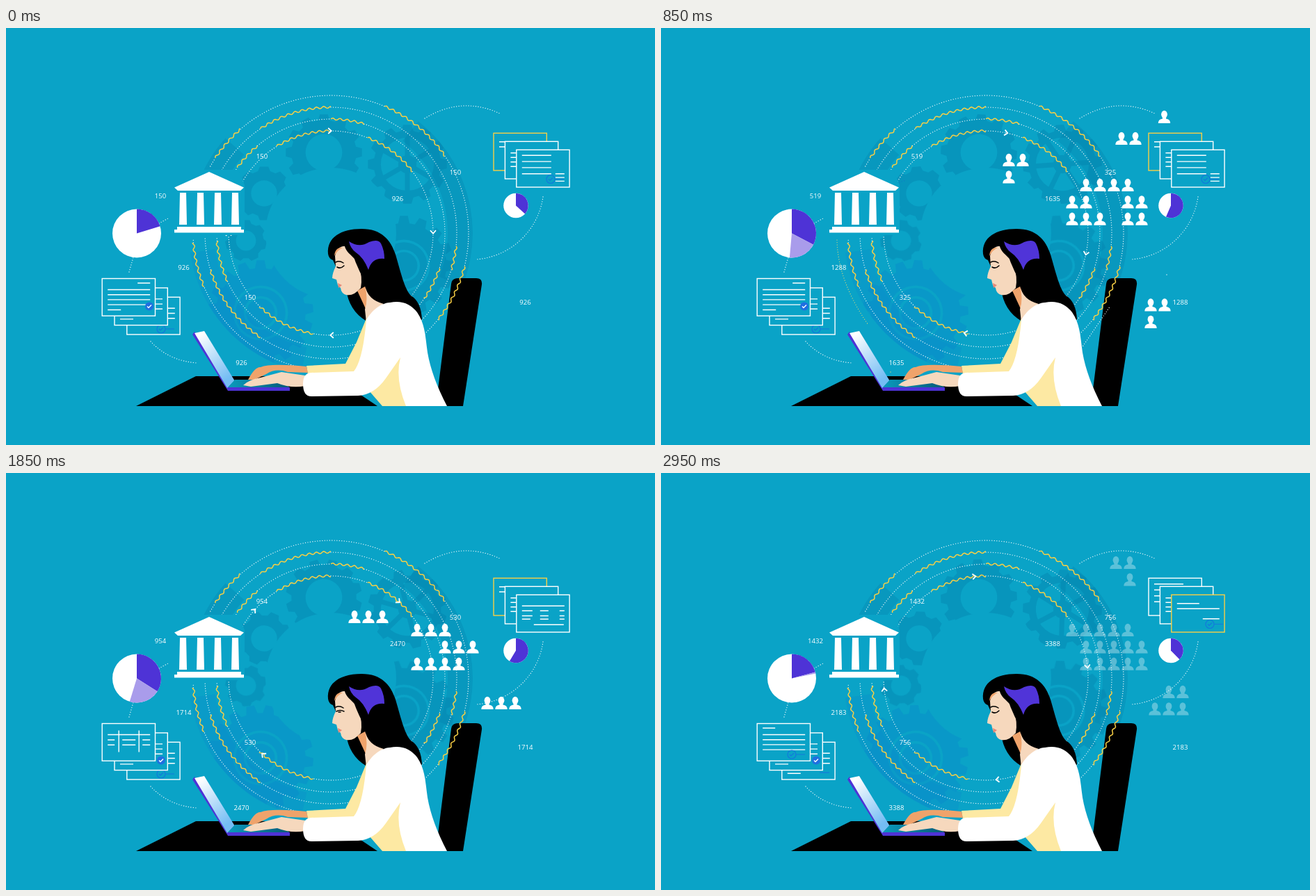
An HTML page for the animation above (3000 ms loop, 933 by 600 pixels).

```html
<!DOCTYPE html>
<html lang="en">
<head>
<meta charset="utf-8">
<title>Data cycle</title>
<style>
html, body { margin: 0; width: 100%; height: 100%; overflow: hidden; background: #0aa3c7; }
svg { display: block; width: 100vw; height: 100vh; }
text { font: 9.6px "Open Sans", "Noto Sans", sans-serif; fill: #fff; text-anchor: middle; }
.dots { fill: none; stroke: #fff; stroke-width: 1.3; stroke-linecap: round; stroke-dasharray: 0 3.5; }
.wave { fill: none; stroke: #f8cf45; stroke-width: 1.5; }
.line { fill: none; stroke: #fff; stroke-width: 1.4; }
.blue { fill: none; stroke: #1478dc; stroke-width: 1.2; }
.skin { fill: #f6d8bd; }
.shadow { fill: #efa36b; }
</style>
</head>
<body>
<svg viewBox="0 0 933 600">
  <defs>
    <linearGradient id="screen" x1="0" y1="0" x2=".5" y2="1">
      <stop offset=".1" stop-color="#fff"/><stop offset="1" stop-color="#74bdf4"/>
    </linearGradient>
    <linearGradient id="keys">
      <stop offset="0" stop-color="#0a9bbd"/><stop offset="1" stop-color="#075a78"/>
    </linearGradient>
    <mask id="band"><circle cx="467" cy="295" r="149" fill="none" stroke="#fff" stroke-width="110"/></mask>
    <g id="person" fill="#fff">
      <ellipse cy="-3.700" rx="4.400" ry="5.500"/>
      <path d="M-2.500 0H2.500V2.600Q8.700 3.500 8.700 9H-8.700Q-8.700 3.500 -2.500 2.600z"/>
    </g>
  </defs>
  <rect width="933" height="600" fill="#0aa3c7"/>
  <g id="gears" mask="url(#band)"></g>
  <path d="M618 544L640 368Q641 360 650 360H676Q685 360 684 369L657 544z"/>
  <g id="rings"></g>
  <g id="trails"></g>
  <g id="arrows"></g>
  <g id="temple"></g>
  <g class="dots">
    <path d="M602 130Q656 97 712 124"/><path d="M772 243A105 105 0 0 1 676 333"/>
    <path d="M208 451Q234 479 275 482"/><path d="M177 351L183 330"/><path d="M220 281L233 274"/>
  </g>
  <g id="pies"></g>
  <g id="cards"></g>
  <g id="people"></g>

  <g id="laptop">
    <path d="M187 544L273 501H470L534 544z"/>
    <path fill="#4e33d6" d="M268 441L271 437L322 517H408V522H319z"/>
    <path fill="url(#screen)" d="M271 439L285 436L329 508L318 518z"/>
    <path fill="url(#keys)" d="M319 517L329 506H400L407 517z"/>
  </g>

  <g id="head">
    <path d="M463 325C461 301 482 289 511 289C540 289 553 305 560 326C567 350 573 376 582 385Q597 394 598 420L540 402L517 421Q493 406 489 376L470 334Q464 332 463 325z"/>
    <path class="skin" d="M473 328Q477 313 487 314C490 326 502 328 507 342Q513 358 510 374Q500 386 489 384Q482 382 481 374L477 370L475 362L469 360Q469 353 474 343z"/>
    <path class="shadow" d="M472 328Q473 315 484 316Q476 320 472 328z"/>
    <path fill="#e88a78" d="M477 367L483 370L478 374z"/>
    <path class="shadow" d="M505 378L516 372L524 392L517 404z"/>
    <path class="skin" d="M516 371Q520 391 543 397Q527 406 518 424L516 405Q521 390 516 371z"/>
    <path d="M493 307Q510 372 545 396L576 394L544 310z"/>
    <path fill="#5034d8" d="M493 307Q508 317 522 308Q535 303 539 310Q544 320 544 332Q526 330 521 348Q514 330 503 323Q495 317 493 307z"/>
    <g fill="none" stroke="#000" stroke-linecap="round" stroke-width="1.5">
      <path d="M474 337Q479 334 485 338"/>
      <path id="shut" d="M476 344Q481 347 486 342"/>
      <path id="open" d="M475 343Q480 340 486 343M478 344H481"/>
    </g>
  </g>

  <g id="body">
    <path fill="#fde9a3" d="M518 418L504 452L488 483L432 486L434 499H502L541 544H580L570 470z"/>
    <path class="shadow" d="M348 506Q358 487 366 488Q380 482 432 487L434 496L405 495Q388 489 374 498L357 506z"/>
    <path class="skin" d="M341 514Q349 506 366 503L396 495L430 500V515Q410 519 390 511L352 516z"/>
    <path fill="#fff" d="M518 420C525 408 537 396 552 395Q576 390 591 409C603 426 603 447 606 467Q612 502 634 544H575Q559 505 567 474L546 504Q529 528 506 529L439 530Q427 530 427 512Q427 497 438 496L500 494Q513 478 518 420z"/>
  </g>
  <g id="numbers"></g>
</svg>
<script>
const LOOP = 3000, STEP = 50, STAGE = 1000, PEAK = 1350;
const CX = 467, CY = 295;
const BACK = "#0aa3c7", YELLOW = "#f8cf45", PURPLE = "#4e33d6";
const $ = id => document.getElementById(id);
const rad = a => a * Math.PI / 180;
const clamp = v => Math.max(0, Math.min(1, v));
const show = (node, on) => { node.style.display = on ? "" : "none"; };

// Angles are in degrees, clockwise from the top.
const polar = (a, r, x = CX, y = CY) =>
  `${(x + r * Math.sin(rad(a))).toFixed(2)} ${(y - r * Math.cos(rad(a))).toFixed(2)}`;

function add(parent, tag, attrs = {}) {
  const node = document.createElementNS("http://www.w3.org/2000/svg", tag);
  for (const key in attrs) node.setAttribute(key, attrs[key]);
  return parent.appendChild(node);
}

function curve(a, b, step, radius) {
  const n = Math.max(2, Math.ceil((b - a) / step));
  const points = Array.from({ length: n + 1 }, (_, i) => a + (b - a) * i / n);
  return "M" + points.map(angle => polar(angle, radius(angle))).join("L");
}

// Rings are dotted, with wavy spans between the given angles.
const wavySpans = [
  [[-57, -41], [23, 56], [104, 129], [247, 266]],
  [[-34, 0], [96, 107], [214, 253]],
  [[-55, -40], [0, 17], [108, 125], [245, 266]],
  [[-32, 0], [21, 53], [190, 224]]
];
wavySpans.forEach((spans, i) => {
  const r = 198 - 17 * i;
  let from = -61;
  for (const [a, b] of [...spans, [268, 268]]) {
    add($("rings"), "path", { class: "dots", d: curve(from, a, 1, () => r) });
    const wave = angle => r + 1.4 * Math.sin(rad(angle - a) * r * 2 * Math.PI / 10.5);
    if (b > a) add($("rings"), "path", { class: "wave", d: curve(a, b, .4, wave) });
    from = b;
  }
});

function gearPath(r, teeth) {
  let d = "";
  for (let i = 0; i < teeth; i++) {
    for (const k of [-.34, -.2, .2, .34]) {
      d += (d ? "L" : "M") + polar((i + k) * 360 / teeth, Math.abs(k) > .3 ? r * .85 : r, 0, 0);
    }
  }
  return d + "z";
}
const circlePath = r => `M${-r} 0a${r} ${r} 0 1 0 ${2 * r} 0a${r} ${r} 0 1 0 ${-2 * r} 0z`;

const gearStyles = {
  hole: (g, r) => gearPath.call(null, r, teethOf(r)) + circlePath(r * .48),
  spokes(g, r, fill) {
    add(g, "circle", { r: r * .23, fill });
    for (let a = 0; a < 360; a += 60) {
      add(g, "path", { d: "M0 0L" + polar(a, r * .7, 0, 0), stroke: fill, "stroke-width": 7 });
    }
    return gearPath(r, teethOf(r)) + circlePath(r * .67);
  },
  rings: (g, r) => gearPath(r, teethOf(r)) + [.52, .47, .32, .27].map(k => circlePath(r * k)).join("")
};
function teethOf(r) { return Math.round(r / 4.6); }

function arcBand(a, b, stroke) {
  add($("gears"), "path", { d: curve(a, b, 1, () => 186), fill: "none", stroke, "stroke-width": 36, opacity: .27 });
}
const shade = "#067aa6", deep = "#0c84cc";
arcBand(38, 112, shade);
arcBand(192, 262, deep);
arcBand(296, 312, shade);
const gears = [
  [457, 179, 55, "hole"], [577, 196, 57, "spokes"], [366, 410, 76, "rings"],
  [371, 238, 39, "hole"], [345, 306, 30, "hole"], [572, 342, 72, "rings"]
].map(([x, y, r, style], i) => {
  const g = add($("gears"), "g", { opacity: .33 }), fill = i === 2 ? deep : shade;
  add(g, "path", { d: gearStyles[style](g, r, fill), fill, "fill-rule": "evenodd" });
  return { g, x, y, turn: (-1) ** i * 4 * 360 / teethOf(r) };
});

// Each trail of dots grows to its full length, then empties from its start.
const trails = [
  { d: "M727 355V372H665L605 460", stroke: "#fff", start: 0, grow: 500, shrink: 560 },
  { d: "M330 495V458L300 430Q254 365 253 305", stroke: "#d8d77c", start: 0, grow: 690, shrink: 890 },
  { d: "M343 222Q366 213 390 222", stroke: "#1478c8", start: 750, grow: 500, shrink: 620 }
].map(({ d, stroke, ...timing }) => {
  const path = add($("trails"), "path", { d, class: "dots", style: `stroke:${stroke}` });
  return { path, length: path.getTotalLength(), ...timing };
});
function drawTrail({ path, length, start, grow, shrink }, t) {
  const head = clamp((t - start) / grow) * length;
  const tail = clamp((t - start - 500) / shrink) * length;
  const count = Math.max(0, Math.floor((head - tail) / 3.5));
  show(path, count);
  path.style.strokeDasharray = `0 ${tail} ` + "0 3.5 ".repeat(count) + "0 999";
}

const arrows = [0, 90, 180, 270].map(angle => ({
  angle, path: add($("arrows"), "path", { class: "line", d: "M-2.5 -4L2 0L-2.5 4", style: "stroke-width:1.8" })
}));

add($("temple"), "path", { fill: BACK, d: "M240 204H334L343 226V298H240z" });
let temple = "M242 229.5L292 207L342 229.5L337 234H247zM246 286H338V290H342V294.5H242V290H246z";
for (let x = 249; x < 330; x += 25) temple += `M${x + 1} 237h9l1 46h-11z`;
add($("temple"), "path", { fill: "#fff", d: temple });

// A pie has a white disc and slices given by their angles.
function pie(x, y, r, ...fills) {
  add($("pies"), "circle", { cx: x, cy: y, r, fill: "#fff" });
  const slices = fills.map(fill => add($("pies"), "path", { fill }));
  return (...angles) => slices.forEach((path, i) => {
    const a = angles[i], b = angles[i + 1];
    path.setAttribute("d", b - a < .5 ? "" :
      `M${x} ${y}L${polar(a, r, x, y)}A${r} ${r} 0 ${+(b - a > 180)} 1 ${polar(b, r, x, y)}z`);
  });
}
const bigPie = pie(188, 295.5, 35, PURPLE, "#a99ceb");
const smallPie = pie(733, 255.5, 17.8, PURPLE);

function rows(a, b, y, count = 1, gap = 7.2) {
  let d = "";
  for (let i = 0; i < count; i++) d += `M${a} ${y + i * gap}H${b}`;
  return d;
}
function card(g, x, y, lines, yellow) {
  const node = add(g, "g", { transform: `translate(${x} ${y})`, class: "line" });
  add(node, "rect", { width: 76.3, height: 53.7, fill: BACK, stroke: yellow ? YELLOW : "#fff" });
  add(node, "path", { d: lines });
}
function badge(g, x, y, filled) {
  add(g, "circle", { cx: x, cy: y, r: 6, class: filled ? "" : "blue", fill: "#1f6fe0" });
  add(g, "path", { class: filled ? "line" : "blue", d: `M${x - 3} ${y}l2 2l4 -4` + (filled ? "" : rows(x + 6, x + 19, y)) });
}

const paragraph = rows(8, 69, 16, 4), side = rows(59, 69, 16, 3), foot = rows(8, 27, 45);
const table = (a, b, c, d, y) => rows(8, 69, 16) + rows(8, a, y, 2) + rows(b, c, y, 2) + rows(d, 69, y, 2);
const leftText = [
  rows(51, 69, 6.5) + paragraph + foot,
  table(18, 29, 48, 58, 23.5) + "M24 10V41M53 10V41",
  rows(8, 26, 6.5) + paragraph
];
const rightText = [
  rows(8, 50, 8, 4, 8.8) + rows(56, 69, 34.5, 3, 5.3),
  table(23, 34, 46, 62, 23) + rows(8, 20, 35) + rows(34, 46, 35) + rows(62, 69, 35) + rows(25, 68, 43),
  rows(8, 40, 12.5) + rows(8, 69, 20) + rows(45, 69, 34.5)
];
const cardSets = leftText.map((text, i) => {
  const g = add($("cards"), "g"), last = i === 2;
  const left = (k, lines) => card(g, 173.8 - 17.8 * k, 387.3 - 13.4 * k, lines);
  const right = (k, lines, yellow) => card(g, 701 + 16.4 * k, 151.3 + 12 * k, lines, yellow);

  left(0, side + (last ? foot : ""));
  if (last) add(g, "path", { class: "blue", d: rows(228, 242, 431) });
  else badge(g, 223, 433);
  left(1, side + foot);
  left(2, text);
  if (last) badge(g, 188, 405);
  badge(g, i ? 223 : 206, i ? 413.5 : 400.5, true);

  right(0, last ? rows(8, 50, 8.5) + rows(8, 17, 17, 3, 8.5) : rows(8, 17, 12.5, 2), !last);
  right(1, rows(8, 17, 16.5, 4, 6.5));
  right(2, rightText[i], last);
  if (i !== 1) badge(g, last ? 789 : 783, 217.5);
  return g;
});

// Groups of people: the corner, then one pattern per row.
const crowds = [
  [[723.5, 128, "x"], [662, 159, "xx"], [500, 190, "xx/x"], [591, 226, ".xxxx/xx..xx/xxx.xx"], [704, 398.5, "xx/x"]],
  [[501, 207, "xxx"], [591, 226, "xxx/..xxx/xxxx"], [692, 331, "xxx"]],
  [[654, 129, "xx/.x"], [591, 226, "xxxxx/.xxxxx/.xxxxx"], [710, 315, ".xx/xxx"]]
].map(groups => {
  const g = add($("people"), "g");
  for (const [x, y, pattern] of groups) {
    pattern.split("/").forEach((row, j) => [...row].forEach((mark, i) => {
      if (mark === "x") add(g, "use", { href: "#person", x: x + 20 * i, y: y + 24.4 * j });
    }));
  }
  return g;
});

// Counters: first value, last value, then two places.
const counters = [
  [150, 1432, [368, 188], [222, 245]], [150, 756, [646, 211], [351, 391]],
  [926, 2183, [255.5, 348], [746.5, 398]], [926, 3388, [563, 249], [338.5, 485]]
].map(([from, to, ...spots]) => ({
  from, to, labels: spots.map(([x, y]) => add($("numbers"), "text", { x, y }))
}));

function render(t) {
  const stage = Math.floor(t / STAGE), local = t % STAGE;
  const rise = t < PEAK ? t / PEAK : (LOOP - t) / (LOOP - PEAK);

  for (const { g, x, y, turn } of gears) {
    g.setAttribute("transform", `translate(${x} ${y}) rotate(${turn * t / LOOP})`);
  }
  trails.forEach(trail => drawTrail(trail, t));
  for (const { angle, path } of arrows) {
    const a = angle + 360 * t / LOOP - .5;
    path.setAttribute("transform", `translate(${polar(a, 147)}) rotate(${a})`);
  }

  const edge = 73 + 71 * rise;
  bigPie(0, edge, edge + 107 * rise);
  smallPie(0, 132 + 113 * rise);

  cardSets.forEach((g, i) => show(g, i === stage));
  crowds.forEach((g, i) => {
    g.style.opacity = i === stage ? clamp(Math.min(local, STAGE - local) / 150) : 0;
  });
  const awake = t >= 1000 && t < 2500;
  show($("open"), awake);
  show($("shut"), !awake);

  for (const { from, to, labels } of counters) {
    const value = Math.round(from + (to - from) * t / (LOOP - STEP));
    labels.forEach(label => { label.textContent = value; });
  }
}

const begin = performance.now();
function tick() {
  const t = (performance.now() - begin) % LOOP;
  render(Math.floor(t / STEP) * STEP);
  requestAnimationFrame(tick);
}
tick();
</script>
</body>
</html>
```
